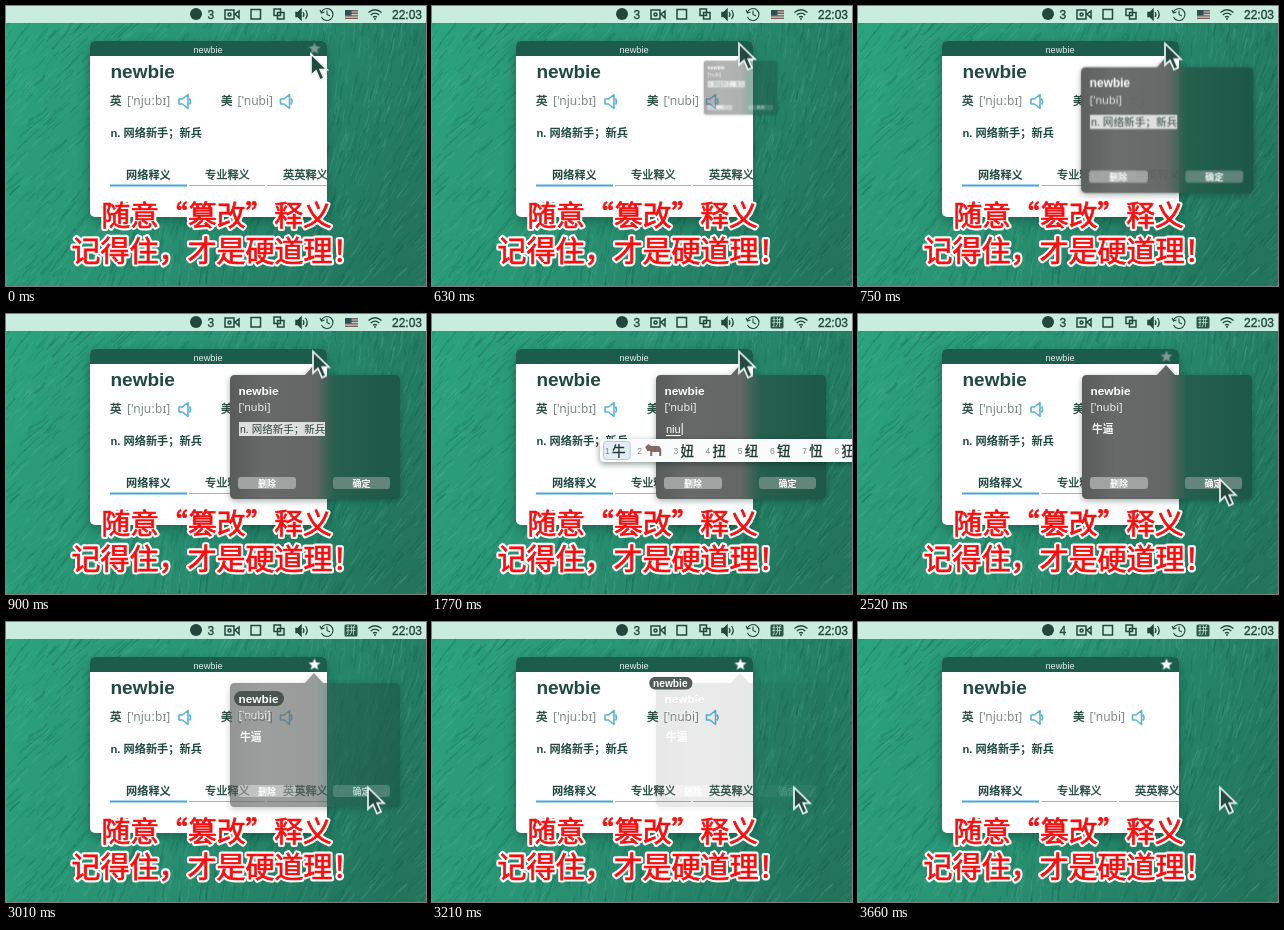
Write an HTML page with a canvas that moves like this. It is 420 px wide and 280 px high and loops after 4.76 s.

```html
<!DOCTYPE html>
<html lang="zh-CN">
<head>
<meta charset="utf-8">
<title>newbie</title>
<style>
  html, body { margin: 0; width: 100%; height: 100%; overflow: hidden; background: #2a9272; }
  canvas, svg { position: absolute; left: 0; top: 0; width: 420px; height: 280px; }
  text { font-family: "Liberation Sans", "Noto Sans CJK SC", "Noto Sans CJK", sans-serif; }
  .cjk { font-family: "Noto Sans CJK SC", "Noto Sans CJK", sans-serif; }
  .phon { font-family: "Noto Sans", sans-serif; }
  .b { font-weight: bold; }
  .mid { text-anchor: middle; }
  .heavy { stroke: #23473d; stroke-width: .35px; }
  .halo { stroke: #fff; stroke-width: 5px; stroke-linejoin: round; }
  .ink { fill: #fb0d0d; stroke: #fb0d0d; stroke-width: .7px; }
  .line { fill: none; stroke: #23473d; stroke-width: 1.5; }
  .sound { fill: none; stroke: #58b2dc; stroke-width: 1.6; stroke-linejoin: round; }
  #popover { transform-origin: 308px 50px; }
  #pill { transform-origin: 253px 76.5px; }
  #win { filter: drop-shadow(0 4px 6px rgba(0, 40, 30, .4)); }
  #popover > path { filter: drop-shadow(0 2px 3px rgba(0, 30, 22, .35)); }
  #bars g > rect:first-child { filter: drop-shadow(0 2px 3px rgba(0, 30, 22, .45)); }
</style>
</head>
<body>
<canvas id="sea" width="420" height="280"></canvas>
<svg viewBox="0 0 420 280">
  <defs>
    <linearGradient id="glass" gradientUnits="userSpaceOnUse" x1="224" x2="395" y1="0" y2="0">
      <stop offset="0" stop-color="#5a5c5b"/>
      <stop offset=".2" stop-color="#686a69"/>
      <stop offset=".5" stop-color="#626664"/>
      <stop offset=".61" stop-color="#265f4d"/>
      <stop offset="1" stop-color="#1d5746"/>
    </linearGradient>
    <path id="sound" class="sound" d="M1 5.5h3.5L10 1v14L4.500 10.500H1zM11.500 5q2 3 0 6"/>
    <path id="star" d="M0-6L1.700-2 6-1.800 2.700 1 3.700 5.300 0 3-3.700 5.300-2.700 1-6-1.800-1.700-2z"/>
    <g id="caption">
      <text class="cjk" x="95.500" y="220" font-size="28.800">随意“篡改”释义</text>
      <text class="cjk" x="65.500" y="255.500" font-size="29">记得住，才是硬道理！</text>
    </g>
  </defs>

  <!-- menu bar -->
  <rect width="420" height="17" fill="#c8ecdd"/>
  <circle cx="190" cy="8" r="6" fill="#23473d"/>
  <g class="heavy" font-size="12" fill="#23473d">
    <text id="three" x="201.500" y="13">3</text>
    <text id="four" x="201.500" y="13">4</text>
    <text x="386" y="12.500">22:03</text>
  </g>
  <g class="line">
    <path d="M219 4h9v9h-9zM229 8l4-3v7z"/>
    <circle cx="223.500" cy="8.500" r="1.500"/>
    <path d="M245 3.500h9.500v9.500h-9.500z"/>
    <path d="M268 3h6.500v6.500H268zM271.500 6.500h6.500v6.500h-6.500z"/>
    <path d="M290 6.500h2l3-3v10l-3-3h-2z" fill="#23473d"/>
    <path d="M297 6q2 2.500 0 5M299.500 4q3.500 4.500 0 9" stroke-width="1.200"/>
    <path d="M315.500 6a6 6 0 1 1 0 5M321 4.500v4l3 1.500M314 4l1.500 3 3-1" stroke-width="1.100"/>
    <path d="M362.500 6.500q6.500-5.500 13 0M364.700 9q4.300-3.700 8.600 0M367 11.300q2-1.600 4 0" stroke-width="1.300"/>
    <circle cx="369" cy="13" r=".6" stroke-width="1"/>
  </g>
  <g id="flag">
    <path d="M339 4h13v9h-13z" fill="#c3cbc4"/>
    <path d="M339 4.700h13M339 7.300h13M339 9.900h13M339 12.400h13" stroke="#7d5f5a" stroke-width="1.400"/>
    <path d="M339 4h6.500v5.500h-6.500z" fill="#2c5052"/>
  </g>
  <g id="pinyin">
    <rect x="338.500" y="2.500" width="13" height="12" rx="1.500" fill="#2b5748"/>
    <text class="cjk mid" x="345" y="12.200" font-size="10" fill="#c8ecdd">拼</text>
  </g>

  <!-- dictionary window -->
  <g id="win">
    <rect x="84" y="35" width="237" height="176" rx="5" fill="#fff"/>
    <path d="M84 50V40q0-5 5-5H316q5 0 5 5V50z" fill="#1c5c4a"/>
  </g>
  <text class="mid" x="202" y="46.500" font-size="9.200" fill="#e3efea">newbie</text>
  <g fill="#1f4a3f">
    <text class="b" x="104.500" y="72" font-size="19">newbie</text>
    <g font-size="12">
      <text class="cjk heavy" x="104" y="98.500" font-size="11.500">英</text>
      <text class="phon" x="121" y="98.500" fill="#7d8985">['njuːbɪ]</text>
      <text class="cjk heavy" x="215" y="98.500" font-size="11.500">美</text>
      <text class="phon" x="231.500" y="98.500" fill="#7d8985">['nubi]</text>
    </g>
    <text class="b" x="104.500" y="130.500" font-size="11.200">n. 网络新手；新兵</text>
    <g font-size="11.200">
      <text class="cjk b" x="120" y="173">网络释义</text>
      <text class="cjk heavy" x="199" y="173">专业释义</text>
      <text class="cjk heavy" x="277" y="173">英英释义</text>
      <text class="cjk b" x="104" y="205" font-size="10">新手</text>
    </g>
  </g>
  <path d="M183 179.500h76M261 179.500h60" stroke="#a9b2af"/>
  <path d="M104 179.500h77" stroke="#48a5d8" stroke-width="2"/>
  <use href="#sound" x="172" y="87.500"/>
  <use href="#sound" x="273.500" y="87.500"/>
  <g transform="translate(308.500 42.500)">
    <use id="starGrey" href="#star" fill="#7c9a91"/>
    <use id="starWhite" href="#star" fill="#fff"/>
  </g>

  <!-- edit popover -->
  <g id="popover">
    <path d="M229 61H299L308 51 317 61H389q5 0 5 5V180q0 5-5 5H229q-5 0-5-5V66q0-5 5-5z" fill="url(#glass)"/>
    <text class="b" x="232.500" y="80.500" font-size="11.800" fill="#fff">newbie</text>
    <text class="phon" x="232.500" y="97" font-size="10.800" fill="#eceeed">['nubi]</text>
    <g id="selected">
      <rect x="233" y="108" width="86" height="14" fill="#dcdfde"/>
      <text x="234" y="119" font-size="10.500" fill="#30423c">n. 网络新手；新兵</text>
    </g>
    <g id="typed" font-size="11" fill="#fff"></g>
    <g id="done">
      <text class="cjk b" x="234" y="119" font-size="10.800" fill="#fff">牛逼</text>
    </g>
    <path id="caret" d="M257.500 109v12" stroke="#fff"/>
    <rect x="232" y="163" width="58" height="12" rx="3" fill="#a0a3a2"/>
    <rect x="327" y="163" width="57" height="12" rx="3" fill="#64857a"/>
    <rect id="press" x="327" y="163" width="57" height="12" rx="3" fill="#9db0aa"/>
    <g font-size="9" fill="#fff">
      <text class="cjk b mid" x="261" y="172.500">删除</text>
      <text class="cjk b mid" x="355.500" y="172.500">确定</text>
    </g>
  </g>
  <g id="bars"></g>
  <g id="pill">
    <rect x="228" y="69" width="50" height="15" rx="7.500" fill="#4b5450"/>
    <text class="b" x="232.500" y="80.500" font-size="11.800" fill="#fff">newbie</text>
  </g>

  <path id="cursor" d="M0 0V21.500L5 17 9 26 13 24.200 9.200 15.600H16z" fill="#24493f" stroke="#eef2f1" stroke-width="1.700"/>

  <use class="halo" href="#caption"/>
  <use class="ink" href="#caption"/>
</svg>
<script>
const LOOP = 4760;
const el = id => document.getElementById(id);

// rows: [ms, properties, easing towards the next row]
function play(node, rows) {
  const frames = rows.map(([ms, props, easing = 'linear']) => ({ ...props, easing, offset: ms / LOOP }));
  if (rows[0][0] > 0) frames.unshift({ ...rows[0][1], easing: 'linear', offset: 0 });
  frames.push({ ...rows[rows.length - 1][1], offset: 1 });
  node.animate(frames, { duration: LOOP, iterations: Infinity });
}

// visible only inside the given [from, to] spans
function show(node, ...spans) {
  const rows = [[0, { opacity: 0 }, 'step-end']];
  for (const [from, to] of spans) {
    if (from === 0) rows.pop();
    rows.push([from, { opacity: 1 }, 'step-end']);
    if (to < LOOP) rows.push([to, { opacity: 0 }, 'step-end']);
  }
  play(node, rows);
}

function add(parent, tag, attrs, text = '') {
  const node = document.createElementNS('http://www.w3.org/2000/svg', tag);
  for (const key in attrs) node.setAttribute(key, attrs[key]);
  node.textContent = text;
  parent.append(node);
  return node;
}

function paintSea() {
  const c = el('sea').getContext('2d');
  const base = c.createLinearGradient(0, 0, 420, 200);
  base.addColorStop(0, '#2ba47c');
  base.addColorStop(.45, '#299373');
  base.addColorStop(1, '#22745b');
  c.fillStyle = base;
  c.fillRect(0, 0, 420, 280);
  let seed = 17;
  const rnd = () => (seed = seed * 16807 % 2147483647) / 2147483647;
  for (let i = 0; i < 2200; i++) {
    const x = rnd() * 440 - 10, y = rnd() * 290;
    const angle = -1.1 + .35 * Math.sin(x / 75 + y / 130);
    const len = 6 + rnd() * 16, bend = (rnd() - .5) * 8;
    const dx = Math.cos(angle) * len, dy = Math.sin(angle) * len;
    c.strokeStyle = rnd() < .5 ? 'rgba(110,195,165,.17)' : 'rgba(8,78,59,.2)';
    c.lineWidth = .5 + rnd();
    c.beginPath();
    c.moveTo(x, y);
    c.quadraticCurveTo(x + dx / 2 + bend, y + dy / 2, x + dx, y + dy);
    c.stroke();
  }
}

function candidates(words, step) {
  const bar = add(el('bars'), 'g', {});
  add(bar, 'rect', { x: 168, y: 125, width: 270, height: 23, rx: 4, fill: '#fafbfb' });
  add(bar, 'rect', { x: 171.5, y: 127.5, width: step - 5.5, height: 18, rx: 3, fill: '#e2edf8', stroke: '#b3cbe2' });
  let x = 173;
  [...words].forEach((word, i) => {
    add(bar, 'text', { x, y: 139.5, 'font-size': 8.5, fill: '#7f8885' }, i + 1);
    if (word === '*') {
      add(bar, 'path', { d: `M${x + 8} 133l3-3 3 2h8l2 3v7h-2v-4h-7v4h-2v-5l-3 0z`, fill: '#856a60' });
      x += 4;
    } else {
      add(bar, 'text', { x: x + 7, y: 141.5, 'font-size': 13.5, fill: '#222b28', class: 'cjk heavy' }, word);
    }
    x += step;
  });
  return bar;
}

const typing = [
  [1530, 'n', '你年那能女呢内拿', 32.2],
  [1650, 'ni', '你呢泥尼拟逆腻妮', 32.2],
  [1740, 'niu', '牛*妞扭纽钮忸狃', 32.2],
  [1920, 'niub', ['牛逼', '牛比', '牛鼻', '牛', '妞', '扭'], 46],
  [2010, 'niubi', ['牛逼', '牛比', '牛鼻', '牛', '妞', '扭'], 46],
];
const COMMIT = 2100;

paintSea();

typing.forEach(([from, keys, words, step], i) => {
  const to = i + 1 < typing.length ? typing[i + 1][0] : COMMIT;
  const word = add(el('typed'), 'g', {});
  const label = add(word, 'text', { x: 234, y: 118.5 }, keys);
  const end = 234 + label.getComputedTextLength();
  add(word, 'path', { d: `M234 121.5H${end}M${end + 1.5} 109v12`, stroke: '#fff' });
  show(word, [from, to]);
  show(candidates(words, step), [from, to]);
});

show(el('selected'), [0, 1530]);
show(el('done'), [COMMIT, LOOP]);
show(el('caret'), [COMMIT, 2490]);
show(el('press'), [2760, 2850]);
show(el('flag'), [0, 1380]);
show(el('pinyin'), [1380, LOOP]);
show(el('three'), [0, 3610]);
show(el('four'), [3610, LOOP]);
show(el('starGrey'), [0, 60], [2220, 2820]);
show(el('starWhite'), [2820, LOOP]);

const at = (x, y) => ({ transform: `translate(${x}px, ${y}px)` });
play(el('cursor'), [
  [0, at(305, 48)],
  [30, at(305, 48)],
  [90, at(307, 37.5)],
  [2130, at(307, 37.5), 'ease-in-out'],
  [2490, at(362, 165.5)],
]);

const zoom = (scale, opacity) => ({ transform: `scale(${scale})`, opacity });
play(el('popover'), [
  [450, zoom(.02, 0)],
  [630, zoom(.425, .5), 'ease-out'],
  [780, zoom(1.05, 1), 'ease-in-out'],
  [900, zoom(1, 1)],
  [2820, zoom(1, 1)],
  [3010, zoom(1, .65)],
  [3060, zoom(1, .58)],
  [3260, zoom(1, 0)],
]);

const fly = (x, y, scale, opacity) => ({ transform: `translate(${x}px, ${y}px) scale(${scale})`, opacity });
play(el('pill'), [
  [2820, fly(0, 0, 1, 0)],
  [2900, fly(0, 0, 1, 1)],
  [3040, fly(0, 0, 1, 1), 'ease-in-out'],
  [3560, fly(-63, -68, .4, .8)],
  [3630, fly(-63, -68, .2, 0)],
]);
</script>
</body>
</html>
```
